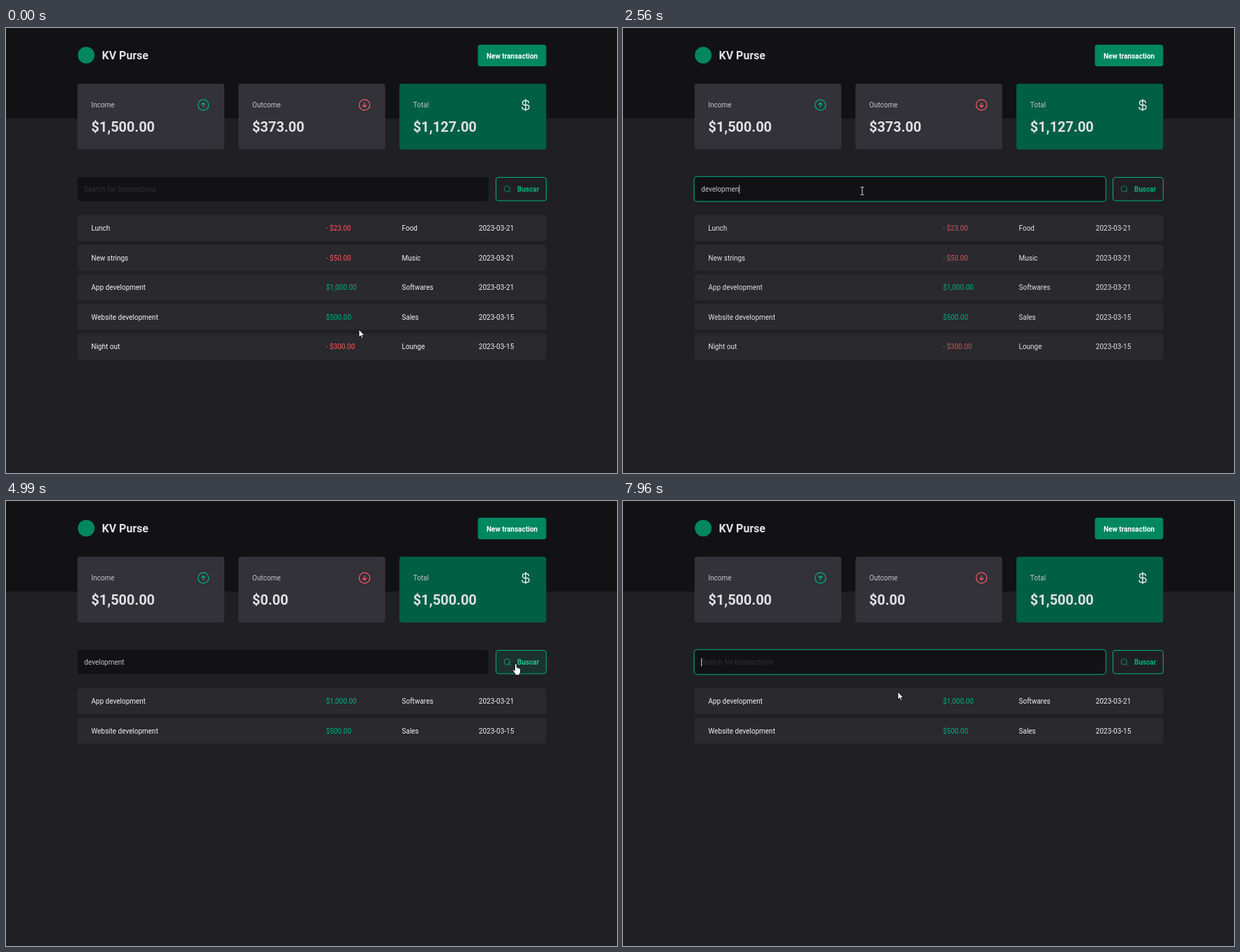
An HTML page for the animation above (8 s loop, 876 by 639 pixels).

```html
<!DOCTYPE html>
<html lang="en">
<head>
<meta charset="utf-8">
<title>Transactions</title>
<style>
  html, body { margin: 0; width: 100%; height: 100%; overflow: hidden; background: #202024; }
  svg { display: block; width: 876px; height: 639px; }
  text { font: 400 10px Roboto, Arial, sans-serif; fill: #e1e1e6; white-space: pre; }
  .b { font-weight: 700; }
  .big { font-size: 20px; font-weight: 700; }
  .label { fill: #c4c4cc; }
  .icon { fill: none; stroke-width: 16; stroke-linecap: round; stroke-linejoin: round; }
  #cursor path { stroke: #000; stroke-width: .9; stroke-linejoin: round; fill: #fff; }
</style>
</head>
<body>
<svg id="stage" viewBox="0 0 876 639">
  <rect width="876" height="639" fill="#202024"/>
  <rect width="876" height="130" fill="#121214"/>
  <circle cx="115" cy="39" r="12" fill="#00875f"/>
  <text x="137.5" y="45" class="b" style="font-size:16px">KV Purse</text>
  <rect x="676.5" y="24" width="98" height="31" rx="3.75" fill="#00875f"/>
  <text x="689" y="43.5" class="b" style="fill:#fff">New transaction</text>

  <g id="cards"></g>
  <g class="icon" stroke="#00b37e" transform="translate(273 100.5) scale(.078125)">
    <circle cx="128" cy="128" r="98"/><path d="M94 122 128 88l34 34M128 88v80"/>
  </g>
  <g class="icon" stroke="#f75a68" transform="translate(504 100.5) scale(.078125)">
    <circle cx="128" cy="128" r="98"/><path d="M94 134l34 34 34-34M128 168V88"/>
  </g>
  <path class="icon" stroke="#fff" transform="translate(735 100.5) scale(.078125)"
    d="M128 24V232M184 88a40 40 0 0 0-40-40H112a40 40 0 0 0 0 80h40a40 40 0 0 1 0 80H104a40 40 0 0 1-40-40"/>

  <rect x="102.5" y="214" width="589.25" height="34.5" rx="3.75" fill="#121214"/>
  <rect id="ring" x="101.9" y="213.4" width="590.5" height="35.7" rx="4.3" fill="none" stroke="#00926a" stroke-width="1.3"/>
  <rect id="mark" y="225" height="13" fill="#1765d4"/>
  <text id="query" x="112" y="235"></text>
  <rect id="caret" y="225.5" width="1" height="12" fill="#c4c4cc"/>

  <g id="button">
    <rect id="fill" x="702.5" y="214.5" width="72" height="33.5" rx="3.5" fill="#00875f"/>
    <rect id="edge" x="702.5" y="214.5" width="72" height="33.5" rx="3.5" fill="none"/>
    <path id="glass" class="icon" transform="translate(712.7 225.2) scale(.0488)" stroke-width="18"
      d="M200 116a84 84 0 1 1-168 0a84 84 0 1 1 168 0M175.4 175.4 224 224"/>
    <text id="go" x="733" y="235" class="b">Buscar</text>
  </g>

  <g id="rows"></g>
  <g id="hint">
    <path d="M173 256H180.5L185 251.5 189.5 256H227a2 2 0 0 1 2 2V284a2 2 0 0 1-2 2H173a2 2 0 0 1-2-2V258a2 2 0 0 1 2-2Z"
      fill="#28282b" stroke="#222225" stroke-width=".8"/>
    <text x="179" y="274" style="font-size:9px;fill:#d4d4d8">dadasd</text>
  </g>

  <circle id="press" r="8.3" fill="#ff0" fill-opacity=".5"/>
  <g id="cursor">
    <g id="arrow"><path d="M0 0V11.2L2.6 8.8 4.5 12.9 6.3 12.1 4.5 8.2H8Z"/></g>
    <g id="beam"><path d="M-2.5-5.5H-.7L0-5 .7-5.5H2.5M0-5V5M-2.5 5.5H-.7L0 5 .7 5.5H2.5" style="stroke:#ddd;stroke-width:1;fill:none"/></g>
    <g id="hand"><path d="M-1.5 1.2a1.4 1.4 0 0 1 2.8 0V5.2Q2.5 4.6 3.2 5.8 4.5 5.2 5 6.4 6.5 6 6.7 7.6V11Q6.4 13 5.4 14.2V16H-1V14.4L-4.4 9.6Q-5 8-3.4 8L-1.5 9.6Z"/></g>
    <g id="stop">
      <circle r="5.2" fill="#fff"/>
      <path d="M-3-3 3 3M4.2 0a4.2 4.2 0 1 1-8.4 0a4.2 4.2 0 1 1 8.4 0" style="stroke:#c31a1f;stroke-width:1.7;fill:none"/>
    </g>
  </g>
</svg>
<script>
const LOOP = 8000;
const WORD = "development";
const KEY_TIMES = [1090, 1160, 1360, 1570, 1770, 1900, 2100, 2300, 2430, 2560, 2630];
const PATH = [
  [0, 506, 433], [70, 505, 432], [820, 343, 234], [3100, 343, 234],
  [3280, 400, 250], [3450, 530, 265], [3640, 688, 262], [3780, 733, 238],
  [3920, 735, 234], [4900, 735, 234], [4990, 731, 234], [6190, 731, 234],
  [6330, 690, 236], [6500, 440, 236], [6720, 172, 232], [6860, 95, 240],
  [7000, 16, 248], [7070, 14, 248], [7700, 14, 248], [7960, 394, 274], [8000, 394, 274]
];
const DATA = [
  ["Lunch", "- $23.00", "Food", "2023-03-21"],
  ["New strings", "- $50.00", "Music", "2023-03-21"],
  ["App development", "$1,000.00", "Softwares", "2023-03-21"],
  ["Website development", "$500.00", "Sales", "2023-03-15"],
  ["Night out", "- $300.00", "Lounge", "2023-03-15"]
];
const COLS = [122.3, 458.7, 567.5, 677.8];

const $ = id => document.getElementById(id);
const show = (id, on) => { $(id).style.display = on ? "" : "none"; };
const within = (t, a, b) => t >= a && t < b;
const ramp = (t, a, b) => Math.min(1, Math.max(0, (t - a) / (b - a)));
const setText = (el, s) => { if (el.textContent !== s) el.textContent = s; };

function add(parent, tag, attrs, text) {
  const el = document.createElementNS("http://www.w3.org/2000/svg", tag);
  for (const k in attrs) el.setAttribute(k, attrs[k]);
  if (text) el.textContent = text;
  return parent.appendChild(el);
}

const sums = ["Income", "Outcome", "Total"].map((name, i) => {
  const x = 102.5 + i * 230.75;
  add($("cards"), "rect", { x, y: 80, width: 210.5, height: 94.5, rx: 3.75, fill: i < 2 ? "#323238" : "#015f43" });
  add($("cards"), "text", { x: x + 19.8, y: 114, class: "label" }, name);
  return add($("cards"), "text", { x: x + 19.8, y: 149, class: "big" });
});

const rows = DATA.map((_, i) => {
  const g = add($("rows"), "g", {});
  const y = 268.5 + i * 42.5;
  add(g, "rect", { x: 102.5, y, width: 672, height: 37.5, rx: 3.75, fill: "#29292e" });
  return { g, cells: COLS.map(x => add(g, "text", { x, y: Math.round(y + 22.5) })) };
});

function cursorAt(t) {
  let i = 1;
  while (i < PATH.length - 1 && PATH[i][0] <= t) i++;
  const [a, x, y] = PATH[i - 1], [b, u, v] = PATH[i];
  let k = ramp(t, a, b);
  if (b === 820 || b === 7960) k = k * k * (3 - 2 * k);
  return [x + (u - x) * k, y + (v - y) * k];
}

const mix = (a, b, k) => `rgb(${a.map((v, i) => Math.round(v + (b[i] - v) * k))})`;
const widthOf = s => {
  setText($("query"), s);
  return s ? $("query").getComputedTextLength() : 0;
};

function drawTable(t) {
  const done = t >= 4920;
  const dim = within(t, 890, 4060);
  const list = done ? DATA.filter(r => r[0].includes(WORD)) : DATA;
  ["$1,500.00", done ? "$0.00" : "$373.00", done ? "$1,500.00" : "$1,127.00"]
    .forEach((s, i) => setText(sums[i], s));
  rows.forEach(({ g, cells }, i) => {
    g.style.display = list[i] ? "" : "none";
    if (!list[i]) return;
    cells.forEach((c, j) => {
      const s = list[i][j];
      setText(c, s);
      c.style.fill = j !== 1 ? (dim ? "#e1e1e6" : "#f4f4f5")
        : s[0] !== "-" ? "#00b37e" : dim ? "#d5525d" : "#fb5a55";
    });
  });
}

function drawInput(t, x) {
  const typed = t >= 7750 ? "" : WORD.slice(0, KEY_TIMES.filter(k => k <= t).length);
  const w = widthOf(typed);
  const focus = within(t, 890, 4060) || t >= 6730;
  const selected = within(t, 6730, 7750);
  show("ring", focus);
  show("caret", focus && !selected);
  $("caret").setAttribute("x", 112 + w);
  show("mark", selected);
  if (selected) {
    const left = Math.min(112 + w, Math.max(112, x));
    $("mark").setAttribute("x", left);
    $("mark").setAttribute("width", 112 + w - left);
  }
  if (!typed) setText($("query"), "Search for transactions");
  $("query").style.fill = !typed ? "#323238" : selected ? "#fff" : "#c4c4cc";
  show("hint", within(t, 1090, 1300));
}

function drawButton(t) {
  const hover = t < 3990 ? ramp(t, 3760, 3960)
    : t < 4920 ? 0 : ramp(t, 4950, 5190) * (1 - ramp(t, 6310, 6510));
  const ink = mix([0, 179, 126], [255, 255, 255], hover);
  $("fill").style.opacity = hover;
  $("edge").style.stroke = mix([0, 179, 126], [0, 135, 95], hover);
  $("glass").style.stroke = $("go").style.fill = ink;
  $("button").style.opacity = within(t, 3990, 4920) ? .6 : 1;
}

function drawCursor(t, x, y) {
  const inside = (l, r) => x > l && x < r && y > 214 && y < 248.5;
  const kind = within(t, 4060, 4920) ? "stop"
    : inside(702, 775) ? "hand" : inside(102, 692) ? "beam" : "arrow";
  for (const k of ["arrow", "beam", "hand", "stop"]) show(k, k === kind);
  const at = `translate(${x} ${y})`;
  $("cursor").setAttribute("transform", at);
  const down = within(t, 890, 1020) || within(t, 3990, 4130) || within(t, 6730, 7340);
  show("press", down);
  $("press").setAttribute("transform", at + (within(t, 7270, 7340) ? " scale(.6)" : ""));
}

function frame() {
  const t = performance.now() % LOOP;
  const [x, y] = cursorAt(t);
  drawTable(t);
  drawInput(t, x);
  drawButton(t);
  drawCursor(t, x, y);
  requestAnimationFrame(frame);
}
frame();
</script>
</body>
</html>
```
